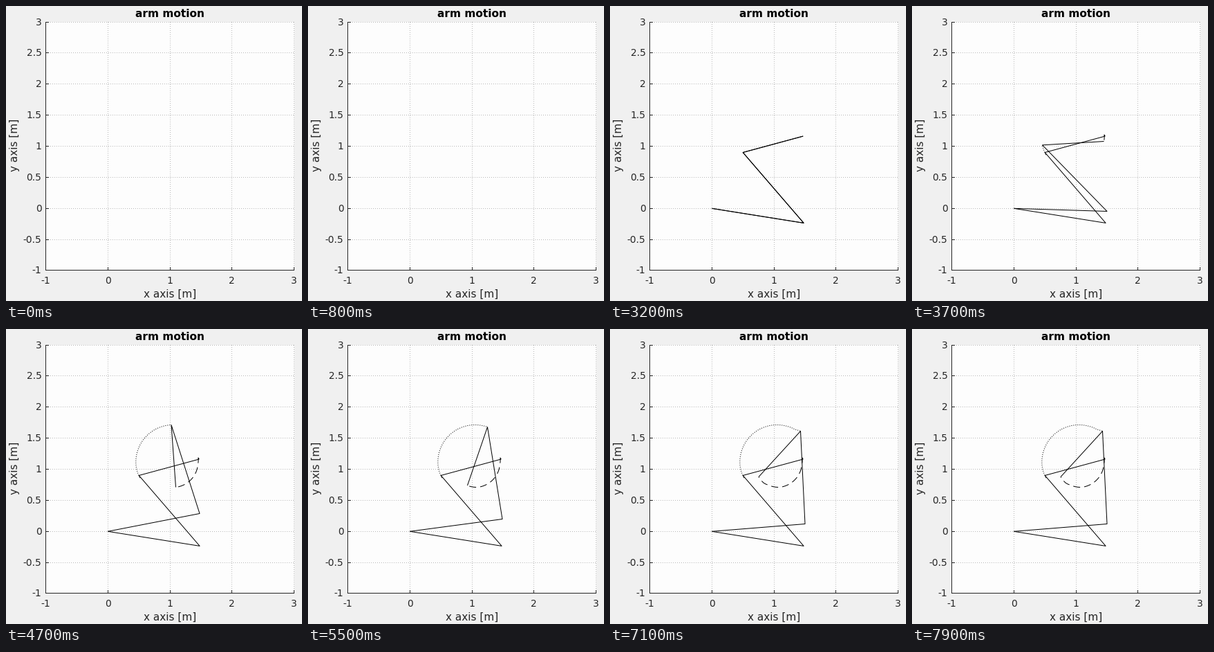
Write a matplotlib script that moves like this. It is 428 px wide and 426 px high and loops after 8 s.

```python
import numpy as np
import matplotlib.pyplot as plt
from matplotlib.animation import FuncAnimation
from matplotlib.patches import Rectangle

W, H, DPI = 428, 426, 100
FRAMES, INTERVAL = 80, 100
FIRST, HOLD = 26, 9            # frame of the first pose, frames per pose
PX = 72 / DPI                  # one pixel in points
LEFT, RIGHT, TOP, BOTTOM = 57.5, 416.5, 23.1, 381.9
INK = "#262626"

# Arm in pixels: fixed base, then elbow, wrist and tip for each pose
BASE = (147.3, 292.3)
ELBOW = [(279.6, 312.9), (281.5, 296), (279.5, 266), (280.5, 274),
         (281, 278.5), (281.5, 281)]
WRIST = [(191.7, 211), (188, 200.3), (238.5, 138), (259, 141),
         (267, 144.5), (275, 147)]
TIP = [(278.7, 187.5), (277, 195), (245, 228), (230, 225.5),
       (222, 222), (214.5, 213)]
PIVOT = np.array((241, 191.5))

plt.rcParams["font.family"] = "DejaVu Sans"
fig = plt.figure(figsize=(W / DPI, H / DPI), dpi=DPI, facecolor="#f0f0f0")
ax = fig.add_axes([0, 0, 1, 1])
ax.set_xlim(0, W)
ax.set_ylim(H, 0)
ax.axis("off")


def column(x):
    return int(LEFT + (x + 1) / 4 * (RIGHT - LEFT))


def row(y):
    return int(BOTTOM - (y + 1) / 4 * (BOTTOM - TOP))


def line(xs=(), ys=(), color="black", **kw):
    return ax.plot(xs, ys, color=color, lw=PX, dash_capstyle="butt",
                   solid_capstyle="butt", snap=False, **kw)[0]


def label(x, y, text, size, color=INK, ha="center", **kw):
    ax.text(x, y, text, fontsize=size, color=color, ha=ha,
            va="baseline", **kw)


def draw_axes():
    # Lines run along pixel centres and start on pixel edges.
    x0, x1, y0, y1 = column(-1), column(3), row(-1), row(3)
    ax.add_patch(Rectangle((x0, y1), x1 - x0 + 1, y0 - y1 + 1,
                           fc="#fdfdfd", ec="none", snap=False))
    dots = dict(color="#b8b8b8", ls=(0, (1, 2)))
    for v in np.arange(-1, 3.5, 1):
        x = column(v)
        line([x + 0.5] * 2, [y0, y1], **dots)
        line([x + 0.5] * 2, [y0, y0 - 4], INK)
        label(x + 0.3, 401, f"{v:g}", 10)
    for v in np.arange(-1, 3.25, 0.5):
        y = row(v)
        line([x0 + 1, x1 + 1], [y + 0.5] * 2, **dots)
        line([x0, x0 + 5], [y + 0.5] * 2, INK)
        label(51.5, y + 5, f"{v:g}", 10, ha="right")
    line([x0 + 0.5] * 2, [y1, y0 + 1], INK)
    line([x0, x1 + 1], [y0 + 0.5] * 2, INK)
    label(237.2, 16, "arm motion", 11.1, "black", weight="bold")
    label(237, 421, "x axis [m]", 11)
    label(17.2, 201.3, "y axis [m]", 11, rotation=90,
          rotation_mode="anchor")


def trail(points, wobble):
    """Paths around the pivot, one for each pose reached."""
    keys = np.array([points[0], wobble] + points[1:]) - PIVOT
    angle = np.unwrap(np.arctan2(keys[:, 1], keys[:, 0]))
    radius = np.hypot(keys[:, 0], keys[:, 1])
    paths = []
    for k in range(len(points)):
        s = np.linspace(0, k + 1 if k else 0, 40 * (k + 1) + 1)
        step = np.arange(len(keys))
        a, r = np.interp(s, step, angle), np.interp(s, step, radius)
        paths.append((PIVOT[0] + r * np.cos(a) + 0.5,
                      PIVOT[1] + r * np.sin(a) + 0.5))
    return paths


def arm_points(k):
    joints = np.array([ELBOW[k], WRIST[k], TIP[k]]) + 0.5
    return np.vstack([BASE, joints]).T


draw_axes()
start_arm = line(*arm_points(0))
arm = line()
wrist_line = line(ls=(0, (1, 2)))
tip_line = line(ls=(0, (10, 6)))
wrist_paths = trail(WRIST, (193.5, 215))
tip_paths = trail(TIP, (277.5, 185.5))
artists = (start_arm, arm, wrist_line, tip_line)


def update(n):
    shown = n >= FIRST
    k = max(0, (n - FIRST) // HOLD)
    arm.set_data(*arm_points(k))
    wrist_line.set_data(*wrist_paths[k])
    tip_line.set_data(*tip_paths[k])
    start_arm.set_visible(shown)
    arm.set_visible(shown)
    for path in (wrist_line, tip_line):
        path.set_visible(shown and k > 0)
    return artists


anim = FuncAnimation(fig, update, frames=FRAMES, interval=INTERVAL,
                     repeat=True, repeat_delay=0, blit=False)
plt.show()
```
